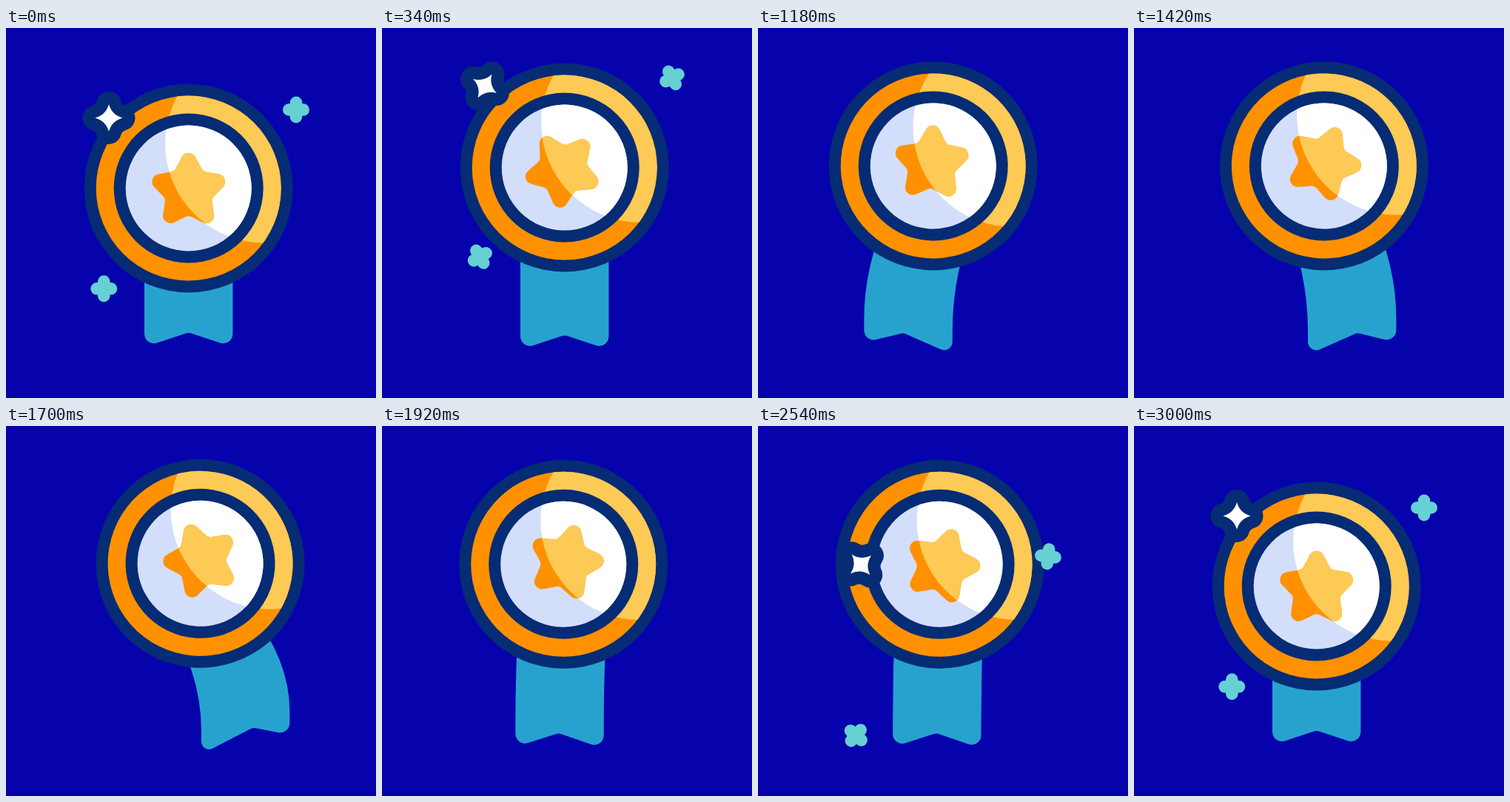
Animation, 500 px wide and 500 px high, one loop 3020 ms. Source, as an HTML page:

```html
<!DOCTYPE html>
<html lang="en">
<head>
<meta charset="utf-8">
<title>Award medal</title>
<style>
  html, body { margin: 0; width: 100%; height: 100%; overflow: hidden; background: #0703ac; }
  svg { display: block; width: 100vw; height: 100vh; }
  .navy { fill: #052c74; }
  .plus { fill: none; stroke: #66d0d2; stroke-width: 16.6; stroke-linecap: round; }
</style>
</head>
<body>
<svg viewBox="0 0 500 500">
  <defs>
    <clipPath id="shine"><circle cx="102.9" cy="-60.3" r="134.5"/></clipPath>
    <path id="star"/>
    <path id="glint" d="M0-18.5Q4-4 18.5 0Q4 4 0 18.5Q-4 4-18.5 0Q-4-4 0-18.5Z"/>
    <path id="cross" d="M-9.7 0H9.7M0-9.7V9.7"/>
  </defs>
  <path id="ribbon" fill="#27a2cf"/>
  <g id="medal">
    <circle class="navy" r="141"/>
    <circle r="125" fill="#ff9100"/>
    <circle r="125" fill="#fdca55" clip-path="url(#shine)"/>
    <circle class="navy" r="101"/>
    <circle r="85" fill="#d3defb"/>
    <circle r="85" fill="#fff" clip-path="url(#shine)"/>
    <use class="spin" href="#star" fill="#ff9100"/>
    <g clip-path="url(#shine)"><use class="spin" href="#star" fill="#fdca55"/></g>
  </g>
  <g id="white">
    <use href="#glint" class="navy" stroke="#052c74" stroke-width="34" stroke-linejoin="round"/>
    <use href="#glint" fill="#fff"/>
  </g>
  <g id="right"><use href="#cross" class="plus"/></g>
  <g id="left"><use href="#cross" class="plus"/></g>
</svg>
<script>
const LOOP = 3020, END = 3000;
const $ = id => document.getElementById(id);
const spins = document.querySelectorAll('.spin');

// [time, value] steps; repeated times make hard jumps
const SWING = [[400, 0], [990, -1], [1610, 1], [2200, -1], [2600, 0]];
const LIFT = [[0, 0], [400, 1], [2600, 1], [3000, 0]];
const DRIFT = [[0, 0], [1000, -160], [2000, -160], [2000, 150], [3000, 0]];
const FADE = [[500, 1], [900, 0], [2000, 0], [2400, 1]];
const SPARKS = [
  { el: $('white'), x: 139, y: 121.5, turn: 270 },
  { el: $('right'), x: 392, y: 110.5, turn: 540 },
  { el: $('left'), x: 132.3, y: 352.3, turn: -270 }
];

const smooth = p => p * p * (3 - 2 * p);
const linear = p => p;

function track(steps, t, ease = smooth) {
  if (t <= steps[0][0]) return steps[0][1];
  for (let i = 1; i < steps.length; i++) {
    const [t0, v0] = steps[i - 1], [t1, v1] = steps[i];
    if (t < t1) return v0 + (v1 - v0) * ease((t - t0) / (t1 - t0));
  }
  return steps[steps.length - 1][1];
}

// Path piece that rounds corner b between a and c with radius r
function corner(a, b, c, r) {
  const unit = p => {
    const x = p[0] - b[0], y = p[1] - b[1], len = Math.hypot(x, y);
    return [x / len, y / len];
  };
  const u = unit(a), v = unit(c);
  const angle = Math.acos(u[0] * v[0] + u[1] * v[1]);
  const d = r / Math.tan(angle / 2);
  const sweep = u[0] * v[1] - u[1] * v[0] < 0 ? 1 : 0;
  return `L${b[0] + u[0] * d} ${b[1] + u[1] * d}` +
    `A${r} ${r} 0 0 ${sweep} ${b[0] + v[0] * d} ${b[1] + v[1] * d}`;
}

function starPath() {
  const pts = Array.from({ length: 10 }, (_, i) => {
    const a = (i * 36 - 90) * Math.PI / 180, r = i % 2 ? 33 : 63;
    return [r * Math.cos(a), 3.9 + r * Math.sin(a)];
  });
  const d = pts.map((p, i) =>
    corner(pts[(i + 9) % 10], p, pts[(i + 1) % 10], i % 2 ? 8 : 10.4)).join('');
  return 'M' + d.slice(1) + 'Z';
}

function ribbonPath(s, lift) {
  const sq = s * s, top = 250, bend = -60 * s;
  const mid = 246.7 + 83 * s + 6 * sq;
  const base = 431.3 + 3.7 * lift - 6 * sq;
  const l = [mid - 59.7, base + 15 * s];
  const r = [mid + 59.7, base - 15 * s];
  const notch = [mid + 12 * s, 411.4 + 3.7 * lift - 10 * sq];
  const endL = [l[0], l[1] - 32], endR = [r[0], r[1] - 32];
  return `M${l[0] + bend} ${top}Q${l[0]} ${(top + endL[1]) / 2} ${endL}` +
    corner(endL, l, notch, 13 - 3 * Math.max(0, s)) +
    corner(l, notch, r, 10) +
    corner(notch, r, endR, 13 - 3 * Math.max(0, -s)) +
    `L${endR}Q${r[0]} ${(top + endR[1]) / 2} ${r[0] + bend} ${top}Z`;
}

function draw(t) {
  const s = track(SWING, t), lift = track(LIFT, t), p = t / END;
  $('ribbon').setAttribute('d', ribbonPath(s, lift));
  // the medal hangs from a pivot above its centre
  $('medal').setAttribute('transform',
    `translate(246.7 ${89 - 29.7 * lift}) rotate(${-8.2 * s}) translate(0 127.5)`);
  spins.forEach(el => el.setAttribute('transform', `rotate(${360 * p})`));
  const dy = track(DRIFT, t), alpha = track(FADE, t, linear);
  for (const { el, x, y, turn } of SPARKS) {
    el.setAttribute('transform', `translate(${x} ${y + dy}) rotate(${turn * p})`);
    el.setAttribute('opacity', alpha);
  }
}

$('star').setAttribute('d', starPath());
const start = performance.now();
function tick() {
  draw(Math.min((performance.now() - start) % LOOP, END));
  requestAnimationFrame(tick);
}
tick();
</script>
</body>
</html>
```
